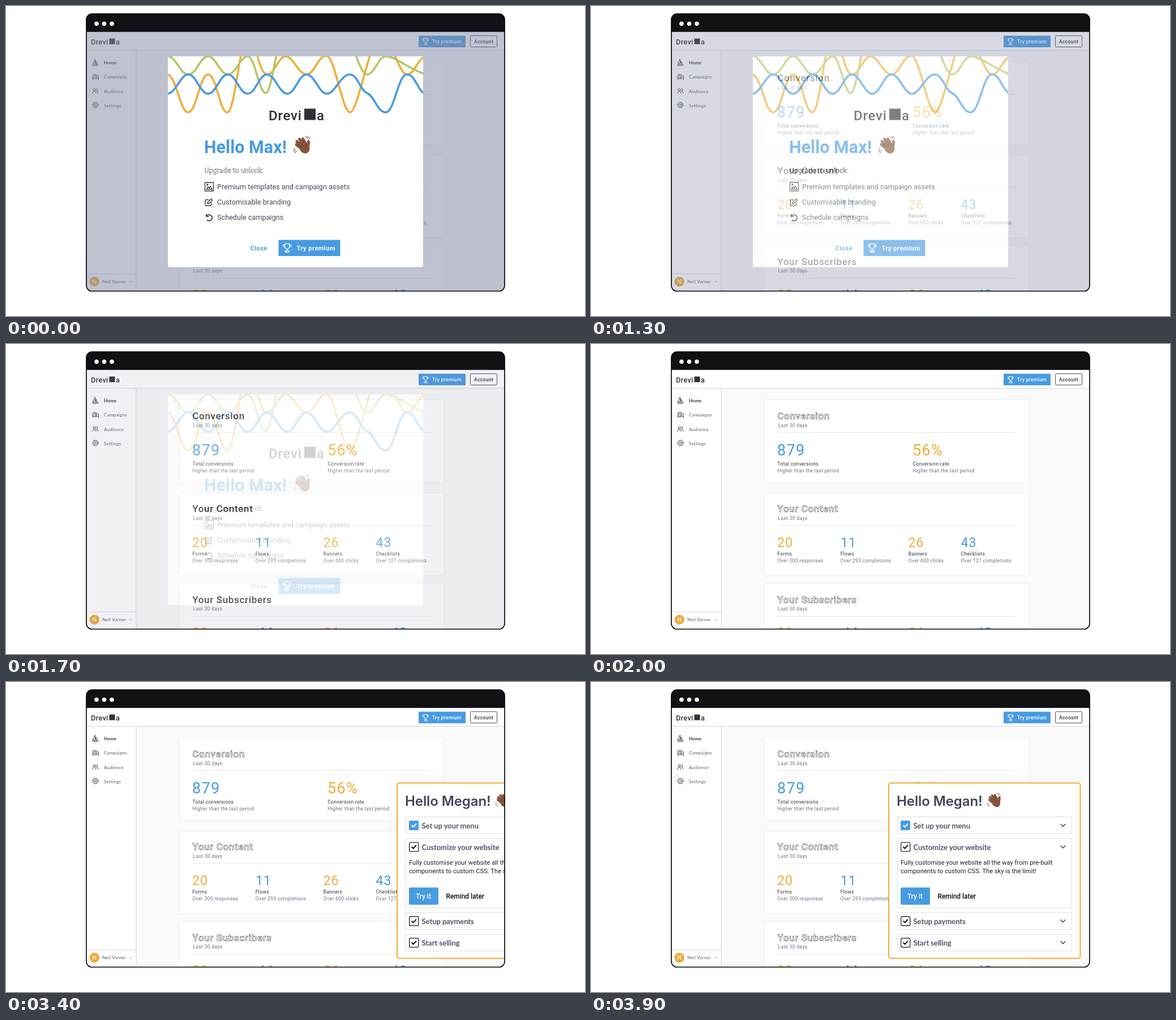
An HTML page for the animation above (5.9 s loop, 1023x548 px).

```html
<!DOCTYPE html>
<html lang="en">
<head>
<meta charset="utf-8">
<title>Onboarding modal and slide-out</title>
<style>
  html, body { margin: 0; width: 100%; height: 100%; overflow: hidden; background: #fff; }
  svg { display: block; width: 100%; height: 100%; }
  text { font-family: Roboto, sans-serif; white-space: pre; }

  .line { fill: none; stroke-linecap: round; stroke-linejoin: round; }
  .blue { fill: #479be1; }
  .gold { fill: #f0ad36; }
  .logo { font-weight: 500; fill: #303038; }

  .nav text, .user { font: 400 8.2px Lato, sans-serif; letter-spacing: .17px; fill: #5b5e72; }
  .nav .on { font-weight: 700; letter-spacing: 0; fill: #32343f; }
  .nav .line { stroke: #4a4c5e; stroke-width: 1; }

  .head { font-size: 17px; font-weight: 500; letter-spacing: .66px; stroke-dasharray: 3 .8; }
  .tiny { font-size: 8.5px; letter-spacing: .34px; fill: #6c6f83; }
  .tiny .key { fill: #33353f; }
  .num { font-size: 23px; letter-spacing: 1px; }
  .big { font-size: 27px; letter-spacing: 1.3px; }
  .btn { font-size: 8.5px; font-weight: 500; letter-spacing: .35px; }
  .btn2 { font-size: 11px; font-weight: 600; letter-spacing: .49px; }
  .card { fill: #fff; filter: drop-shadow(0 .6px .8px rgba(30, 32, 60, .14)); }

  .perk { font-size: 12.6px; letter-spacing: .04px; fill: #46485c; }
  .lead { font-size: 12.6px; stroke-dasharray: 2.5 1; }
  .task { font: 700 13px Lato, sans-serif; letter-spacing: -.05px; fill: #50536b; }
  .row { fill: #fff; stroke: #dcdee5; }
  .box { fill: #fff; stroke: #15151b; stroke-width: 1.2; }

  .modal { animation: fade 5900ms infinite step-end; }
  .panel { animation: slide 5900ms infinite step-end; }
  .head { animation: hollow 5900ms infinite step-end; }
  .lead { animation: fill-in 5900ms infinite step-end; }

  @keyframes fade {
    0% { opacity: 1; }
    16.949% { opacity: .92; animation-timing-function: steps(9, end); }
    32.203% { opacity: .02; }
    33.898%, 100% { opacity: 0; }
  }
  @keyframes slide {
    0% { transform: translateX(400px); }
    50.847% { transform: translateX(306px); animation-timing-function: steps(4, end); }
    57.627% { transform: translateX(165px); animation-timing-function: steps(5, end); }
    66.101%, 100% { transform: translateX(0); }
  }
  @keyframes hollow {
    0% { fill: #22232b; stroke: none; }
    33.898%, 100% { fill: #fff; stroke: #121217; stroke-width: .6px; }
  }
  @keyframes fill-in {
    0% { fill: #fff; stroke: #16161c; stroke-width: .45px; }
    16.949%, 100% { fill: #101016; stroke: none; }
  }
</style>
</head>
<body>
<svg viewBox="0 0 1023 548" preserveAspectRatio="none">
  <defs>
    <clipPath id="win"><rect x="142" y="13.8" width="739" height="490.2" rx="10"/></clipPath>
    <clipPath id="sheet"><rect x="286" y="89" width="451" height="372.5" rx="3"/></clipPath>

    <g id="cup" class="line" stroke="#fff" stroke-width="1.2">
      <path d="M4.5 1.5h7v5a3.5 3.5 0 0 1-7 0zM4.5 3H1.8v1.5A2.7 2.7 0 0 0 4.7 7.2M11.5 3h2.7v1.5a2.7 2.7 0 0 1-2.9 2.7M8 10v2.5M5 15v-2.3h6V15z"/>
    </g>
    <g id="hand">
      <g class="line" stroke="#86573b" stroke-width="5">
        <path d="M17 19L7 9.5M20 16L11.500 5.500M23 14L17.500 5M16 23L6 15M25 20Q28.500 15 27.500 9.500"/>
      </g>
      <path fill="#86573b" d="M11 17L22 10.500Q28 13 29.500 20Q30 28 24 30.500Q18 31.500 13 26Z"/>
      <path class="line" stroke="#5d3823" stroke-width=".8" d="M9.500 14.500L16 20M11 9.500L18.500 17.500M16 7.500L21.500 15M22 23Q22 18 26 17"/>
      <path class="line" stroke="#6d6f78" stroke-width="1.1" d="M21.500 1.500Q25.500 2 27 5.500M24.500 .5Q28.500 1.500 30 5M2 20.500Q3 25 7 27M.8 24Q2 28 5.500 29.500"/>
    </g>
    <path id="chev" class="line" d="M-4-2L0 2L4-2" stroke="#484b60" stroke-width="1.6"/>
    <path id="tick" class="line" d="M-3.500 .2L-1 2.700L3.700-2.500" stroke-width="2"/>
  </defs>

  <g clip-path="url(#win)">
    <rect x="142" y="13" width="739" height="491" fill="#fff"/>
    <rect x="230" y="78" width="651" height="426" fill="#fafafa"/>

    <!-- header -->
    <g class="logo" font-size="12.8">
      <text x="150" y="67.700" letter-spacing=".3">Drevi</text>
      <rect x="182.500" y="57.500" width="10" height="10"/>
      <text x="194" y="67.700">a</text>
    </g>
    <rect class="blue" x="729" y="52.500" width="83" height="20.500" rx="1"/>
    <use href="#cup" transform="translate(735 56.300) scale(.8)"/>
    <text class="btn" x="753" y="65.700" fill="#fff">Try premium</text>
    <rect x="820.500" y="52.500" width="47" height="20" rx="1" fill="#fff" stroke="#4a4c5b"/>
    <text class="btn" x="827" y="65.700" fill="#2e303c">Account</text>
    <path class="line" stroke="#d3d5db" d="M143 78.300H881M230 78V504M143 473.500H230"/>

    <!-- sidebar -->
    <g class="nav">
      <text class="on" x="173" y="103">Home</text>
      <text x="173" y="128.300">Campaigns</text>
      <text x="173" y="153.700">Audience</text>
      <text x="173" y="178.800">Settings</text>
      <path class="line" d="M157.500 94V101.500H153.700ZM159 97.500L161.500 101.500H159ZM152.500 103.500H163.200L161.500 105.200H154.200Z"/>
      <path class="line" d="M155 128.500L153 129.500V122.500Q153 121 154.500 121H160M156 123H162.500Q163.500 123 163.500 124V130L161.700 128.500H156Q155 128.500 155 127.500V124Q155 123 156 123M157.500 125.200H161M157.500 126.800H161"/>
      <path class="line" d="M153 154.500Q153 150.500 156 150.500T159 154.500M160 150.500Q163 150.500 163 154M159.500 146Q162 146 162 148T160 150"/>
      <circle class="line" cx="156" cy="148" r="2"/>
      <circle class="line" cx="158" cy="175" r="1.800"/>
      <circle class="line" cx="158" cy="175" r="4.300"/>
      <circle class="line" cx="158" cy="175" r="5.200" stroke-dasharray="2 2.084" style="stroke-linecap:butt"/>
    </g>
    <circle cx="156.200" cy="487.200" r="8.700" fill="#eaab3c"/>
    <text x="156.200" y="491" text-anchor="middle" font-size="10.500" fill="#fff">N</text>
    <text class="user" x="170" y="489.700">Neil Varner</text>
    <use href="#chev" transform="translate(220.500 487.300) scale(.4)"/>

    <!-- dashboard -->
    <rect class="card" x="306.500" y="99" width="467" height="146" rx="1"/>
    <rect class="card" x="306.500" y="264" width="467" height="145" rx="1"/>
    <rect class="card" x="306.500" y="423.500" width="467" height="100" rx="1"/>
    <path class="line" stroke="#e9e9ed" d="M330 156.500H750M330 320.500H750M330 481.500H750"/>
    <text class="head" x="329.300" y="133">Conversion</text>
    <text class="head" x="329.300" y="297">Your Content</text>
    <text class="head" x="329.300" y="457.600">Your Subscribers</text>
    <g class="big">
      <text class="blue" x="329" y="196.500">879</text>
      <text class="gold" x="568" y="196.500">56%</text>
    </g>
    <g class="num">
      <text class="gold" x="329" y="358.600">20</text>
      <text class="blue" x="441" y="358.600">11</text>
      <text class="gold" x="560.500" y="358.600">26</text>
      <text class="blue" x="653.500" y="358.600">43</text>
      <text class="gold" x="329" y="517.800">28</text>
      <text class="blue" x="445" y="517.800">44</text>
      <text class="gold" x="561.500" y="517.800">26</text>
      <text class="blue" x="681" y="517.800">48</text>
    </g>
    <g class="tiny">
      <text x="330.500" y="147">Last 30 days</text>
      <text x="330.500" y="310.700">Last 30 days</text>
      <text x="330.500" y="471">Last 30 days</text>
      <text class="key" x="329.500" y="214.500">Total conversions</text>
      <text x="329.300" y="227.200">Higher than the last period</text>
      <text class="key" x="568.500" y="214.500">Conversion rate</text>
      <text x="568.300" y="227.200">Higher than the last period</text>
      <text class="key" x="329.300" y="374">Forms</text>
      <text x="329.300" y="386">Over 300 responses</text>
      <text class="key" x="440.800" y="374">Flows</text>
      <text x="440.800" y="386">Over 293 completions</text>
      <text class="key" x="560.800" y="374">Banners</text>
      <text x="560.800" y="386">Over 600 clicks</text>
      <text class="key" x="653.600" y="374">Checklists</text>
      <text x="653.600" y="386">Over 127 completions</text>
    </g>

    <!-- modal -->
    <g class="modal">
      <rect x="142" y="45.500" width="739" height="459" fill="rgb(128,134,162)" fill-opacity=".5"/>
      <rect x="286" y="89" width="451" height="372.500" rx="3" fill="#fff"/>
      <g class="line" stroke-width="3.600" clip-path="url(#sheet)">
        <path stroke="#f0ad36" d="M284 121C301 121 307 188 322 188S342 121 357 121S377 188 391 188S413 55 427 55S447 121 461 121S481 89 494 89S517 121 531 121S551 88 566 88S594 188 608 188S645 50 662 50S694 121 708 121S726 96 738 91"/>
        <path stroke="#b5c563" d="M284 88C301 88 307 121 322 121S343 89 357 89S378 121 392 121S414 89 427 89S447 154 459 154S482 30 494 30S585 60 600 60S624 121 638 121S657 89 672 89S700 104 738 120"/>
        <path stroke="#479be1" d="M285 155C300 155 308 121 322 121S343 155 357 155S378 121 392 121S413 155 427 155S447 121 461 121S483 155 497 155S517 121 531 121S553 155 567 155S592 121 607 121S625 149 638 154S656 188 671 188S693 121 708 121S725 145 738 154"/>
      </g>
      <g class="logo" font-size="24">
        <text x="464" y="201.500" letter-spacing=".8">Drevi</text>
        <rect x="527" y="181.500" width="20" height="20"/>
        <text x="549" y="201.500">a</text>
      </g>
      <text class="blue" x="350" y="259.500" font-size="30.500" font-weight="600">Hello Max!</text>
      <use href="#hand" x="507" y="230"/>
      <text class="lead" x="350.500" y="294.600">Upgrade to unlock:</text>
      <text class="perk" x="373" y="324.200">Premium templates and campaign assets</text>
      <text class="perk" x="373" y="351.300">Customisable branding</text>
      <text class="perk" x="373" y="378.400">Schedule campaigns</text>
      <g class="line" stroke="#33353f" stroke-width="1.300">
        <path d="M351.500 312H366.500V327H351.500ZM354 324L357.500 319.500L359.500 322L361.500 318.500L364.500 324Z"/>
        <circle cx="355.800" cy="316" r="1"/>
        <path d="M357.500 342.500H353.500Q352 342.500 352 344V351.500Q352 353 353.500 353H361Q362.500 353 362.500 351.500V347.500M356 349.500L356.500 346.800L362.300 341L364.600 343.300L358.700 349Z"/>
        <path stroke-width="1.700" d="M354 368V372H358M354.300 371.800A5.300 5.300 0 1 1 355.500 378.500"/>
      </g>
      <text class="btn2 blue" x="431.500" y="431.500">Close</text>
      <rect class="blue" x="481.500" y="413.500" width="109" height="28.500" rx="1.500"/>
      <use href="#cup" transform="translate(488 418.500) scale(1.100)"/>
      <text class="btn2" x="513.500" y="431.500" fill="#fff">Try premium</text>
    </g>

    <!-- checklist panel -->
    <g class="panel">
      <rect x="526" y="178.500" width="338.500" height="310" rx="4" fill="#fff" stroke="#f0ad36" stroke-width="2"/>
      <text x="540" y="219" style="font:600 24px Inter, sans-serif" letter-spacing="-.1" fill="#43455b">Hello Megan!</text>
      <use href="#hand" transform="translate(699 196) scale(.82)"/>
      <rect class="row" x="541.500" y="238.500" width="307.500" height="29.500"/>
      <rect class="row" x="541.500" y="277" width="307.500" height="122.500"/>
      <rect class="row" x="541.500" y="407.700" width="307.500" height="29.500"/>
      <rect class="row" x="541.500" y="446" width="307.500" height="29.500"/>

      <rect class="blue" x="547" y="245" width="17" height="17" rx="2"/>
      <rect class="box" x="547.700" y="283.500" width="16" height="16" rx="2"/>
      <rect class="box" x="547.700" y="414.700" width="16" height="16" rx="2"/>
      <rect class="box" x="547.700" y="452.800" width="16" height="16" rx="2"/>
      <use href="#tick" x="555.700" y="253.500" stroke="#fff"/>
      <g stroke="#111116">
        <use href="#tick" x="555.700" y="291.500"/>
        <use href="#tick" x="555.700" y="422.700"/>
        <use href="#tick" x="555.700" y="460.800"/>
      </g>
      <text class="task" x="569.500" y="258.600">Set up your menu</text>
      <text class="task" x="569.500" y="296.800">Customize your website</text>
      <text class="task" x="569.500" y="427.800">Setup payments</text>
      <text class="task" x="569.500" y="466">Start selling</text>
      <use href="#chev" x="834" y="253.500"/>
      <use href="#chev" x="834" y="291.500"/>
      <use href="#chev" x="834" y="422.500"/>
      <use href="#chev" x="834" y="460.700"/>

      <g font-size="11.200" fill="#24182f">
        <text x="547" y="322.500">Fully customise your website all the way from pre-built</text>
        <text x="547" y="338.200">components to custom CSS. The sky is the limit!</text>
      </g>
      <rect class="blue" x="547" y="363.200" width="52" height="30.500" rx="2"/>
      <g font-size="11.900" font-weight="500">
        <text x="559" y="382.600" fill="#fff">Try it</text>
        <text x="612.500" y="382.600" fill="#0c0c10">Remind later</text>
      </g>
    </g>

    <rect x="142" y="13" width="739" height="32.800" fill="#101015"/>
    <g fill="#fff">
      <circle cx="160" cy="31.200" r="3.800"/>
      <circle cx="173.500" cy="31.200" r="3.800"/>
      <circle cx="187" cy="31.200" r="3.800"/>
    </g>
  </g>
  <rect x="142" y="13.800" width="739" height="490.200" rx="10" fill="none" stroke="#08080b" stroke-width="1.700"/>
</svg>
</body>
</html>
```
